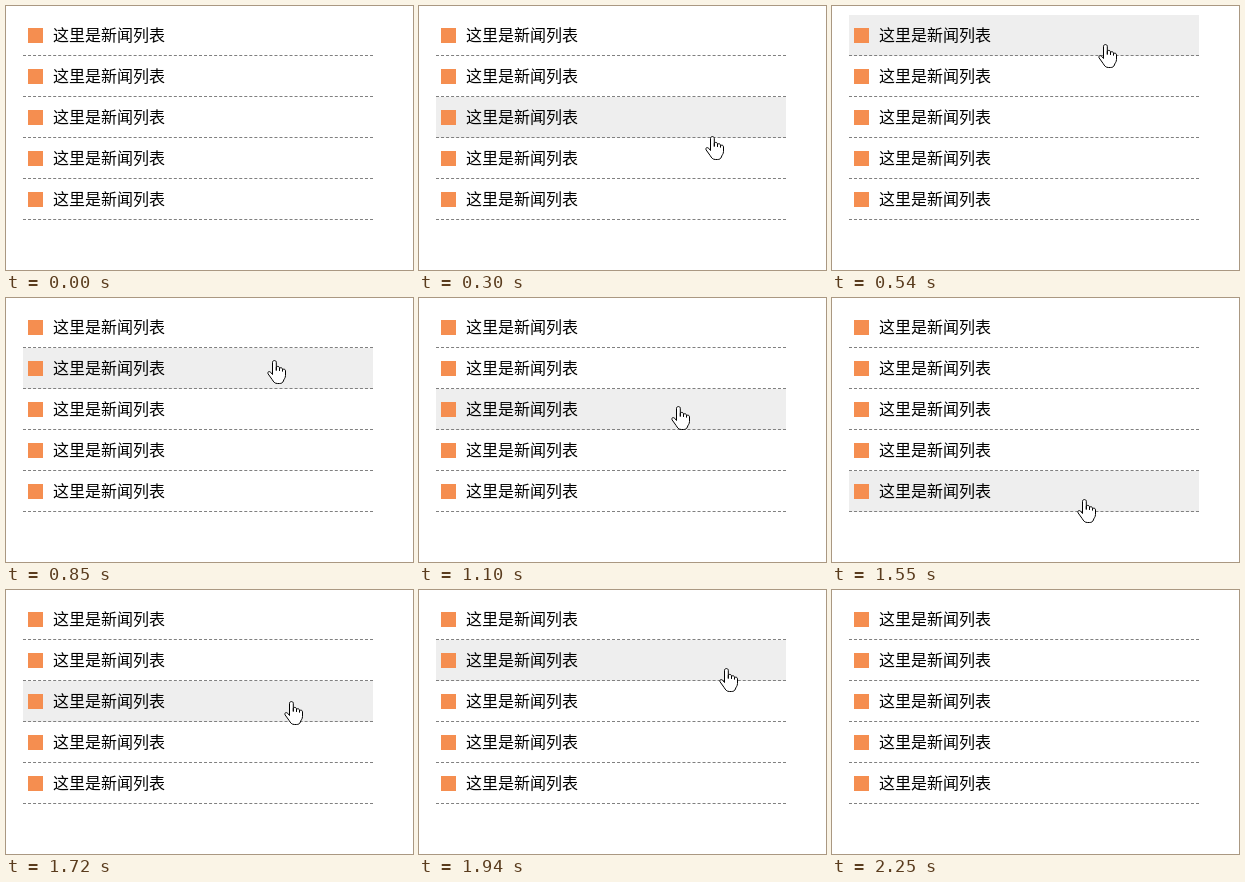
An HTML page with a canvas that plays this animation: 407 px wide and 264 px high, repeating every 2.71 s.

```html
<!DOCTYPE html>
<html lang="zh-CN">
<head>
<meta charset="utf-8">
<title>新闻列表</title>
<style>
html, body { margin: 0; width: 100%; height: 100%; overflow: hidden; background: #fff; }
ul { position: absolute; left: 17px; top: 9px; width: 350px; margin: 0; padding: 0; list-style: none; }
li {
  position: relative; height: 40px; padding-left: 30px;
  border-bottom: 1px dashed #808080;
  font: 350 16px/38px "Noto Sans CJK SC", "Noto Sans CJK", sans-serif; color: #000;
}
li::before {
  content: ""; position: absolute; left: 5px; top: 13px;
  width: 15px; height: 15px; background: #f58e50;
}
li.on { background: #eee; }
canvas { position: absolute; left: 0; top: 0; }
</style>
</head>
<body>
<ul></ul>
<canvas width="407" height="264"></canvas>
<script>
const LOOP = 2710, ROWS = 5, TOP = 9, ROW_H = 41;
const list = document.querySelector('ul');
const ctx = document.querySelector('canvas').getContext('2d');
const rows = Array.from({ length: ROWS }, () => {
  const li = document.createElement('li');
  li.textContent = '这里是新闻列表';
  return list.appendChild(li);
});

// Pointer strokes: each goes from a to b in equal time steps, then rests
const moves = [
  { start: 70, end: 540, steps: 6, a: [318, 237], b: [274, 38], pow: 0.9 },
  { start: 760, end: 1250, steps: 6, a: [272, 47], b: [254, 138], pow: 1 },
  { start: 1330, end: 1550, steps: 3, a: [252, 153], b: [253, 201], pow: 0.7 },
  { start: 1640, end: 1790, steps: 2, a: [268, 158], b: [303, 63], pow: 1 },
  { start: 1880, end: 2250, steps: 5, a: [302, 55], b: [374, 321], pow: 1.53 }
];

function pointerAt(t) {
  const m = moves.findLast(m => t >= m.start);
  if (!m) return null;
  const step = Math.floor((t - m.start) / (m.end - m.start) * m.steps + 0.2);
  const u = Math.min(1, step / m.steps) ** m.pow;
  return m.a.map((v, i) => Math.round(v + (m.b[i] - v) * u));
}

const hand = new Path2D(
  'M5.5 14.5V2.3C5.5 0 9.3 0 9.3 2.3V10.5V7.6C9.3 5.9 12.5 6 12.5 8V10.8' +
  'V8.8C12.5 7.2 15.5 7.4 15.5 9.2V11.4V10.2C15.5 8.7 18.5 8.8 18.5 10.8' +
  'V15.5C18.5 18.3 16.6 19.3 16.4 21C15.8 22.8 14.4 23.5 12.4 23.5H10.4' +
  'C7.6 23.5 6.4 21.6 5.2 19.6L1.2 14C0 12 2.2 10.8 3.7 12.3Z');
const arrow = new Path2D('M.5 .5V16.5L4.2 13L6.6 18.6L9.2 17.5L6.8 12H11.8Z');

function drawPointer(shape, x, y) {
  ctx.save();
  ctx.translate(x, y);
  ctx.fillStyle = '#fff';
  ctx.strokeStyle = '#000';
  ctx.lineJoin = 'round';
  ctx.fill(shape);
  ctx.stroke(shape);
  ctx.restore();
}

const start = performance.now();

function frame() {
  const spot = pointerAt((performance.now() - start) % LOOP);
  const hover = spot ? Math.floor((spot[1] - TOP) / ROW_H) : -1;
  rows.forEach((li, i) => li.classList.toggle('on', i === hover));
  ctx.clearRect(0, 0, 407, 264);
  if (spot) {
    const [x, y] = spot;
    if (rows[hover]) drawPointer(hand, x - 8, y);
    else drawPointer(arrow, x, y);
  }
  requestAnimationFrame(frame);
}
frame();
</script>
</body>
</html>
```
